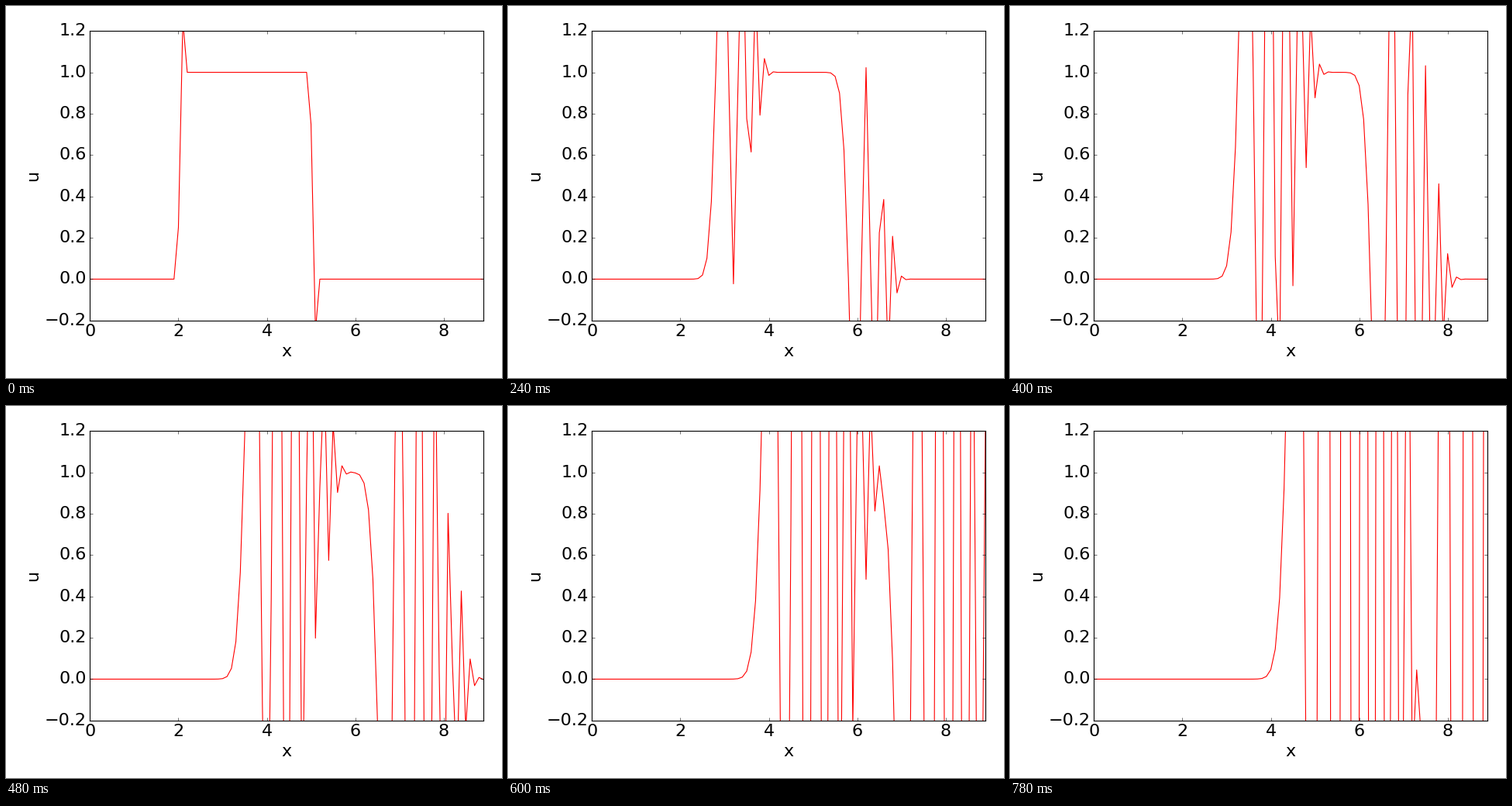
A matplotlib script that plays this animation: 640 px wide and 480 px high, repeating every 0.8 s.

```python
import numpy as np
import matplotlib.pyplot as plt
from matplotlib.animation import FuncAnimation

W, H, DPI = 640, 480, 80
LEFT, RIGHT, TOP, BOTTOM = 108.4, 616.0, 32.2, 405.8   # axes box in pixels
FRAMES, INTERVAL = 40, 20
DX, POINTS, COURANT = 0.1, 90, 0.5

plt.style.use("classic")
plt.rcParams.update({
    "font.family": "DejaVu Sans",
    "font.size": 20,
    "xtick.labelsize": 20,
    "ytick.labelsize": 20,
    "savefig.dpi": "figure",
})


def advect(u):
    """One Euler step of second-order upwind advection (unstable)."""
    new = u.copy()
    new[2:] -= COURANT / 2 * (3 * u[2:] - 4 * u[1:-1] + u[:-2])
    return new


def solve():
    u = np.zeros(POINTS)
    u[20:50] = 1
    states = []
    for _ in range(FRAMES):
        u = advect(u)
        states.append(u)
    return states


x = DX * np.arange(POINTS)
states = solve()

fig = plt.figure(figsize=(W / DPI, H / DPI), dpi=DPI, facecolor="white")
ax = fig.add_axes([LEFT / W, 1 - BOTTOM / H,
                   (RIGHT - LEFT) / W, (BOTTOM - TOP) / H])
ax.set_xlim(0, x[-1])
ax.set_ylim(-0.2, 1.2)
ax.set_xticks(range(0, 9, 2))
ax.set_yticks(np.arange(-1, 7) / 5)

label = dict(ha="center", va="baseline", rotation_mode="anchor")
fig.text((LEFT + RIGHT) / 2 / W, 1 - 452 / H, "x", **label)
fig.text(41 / W, 1 - (TOP + BOTTOM) / 2 / H, "u", rotation=90, **label)

line, = ax.plot(x, states[0], color="red", lw=1)


def update(frame):
    line.set_ydata(states[frame])
    return line,


anim = FuncAnimation(fig, update, frames=FRAMES, interval=INTERVAL,
                     repeat=True, repeat_delay=0)
plt.show()
```
